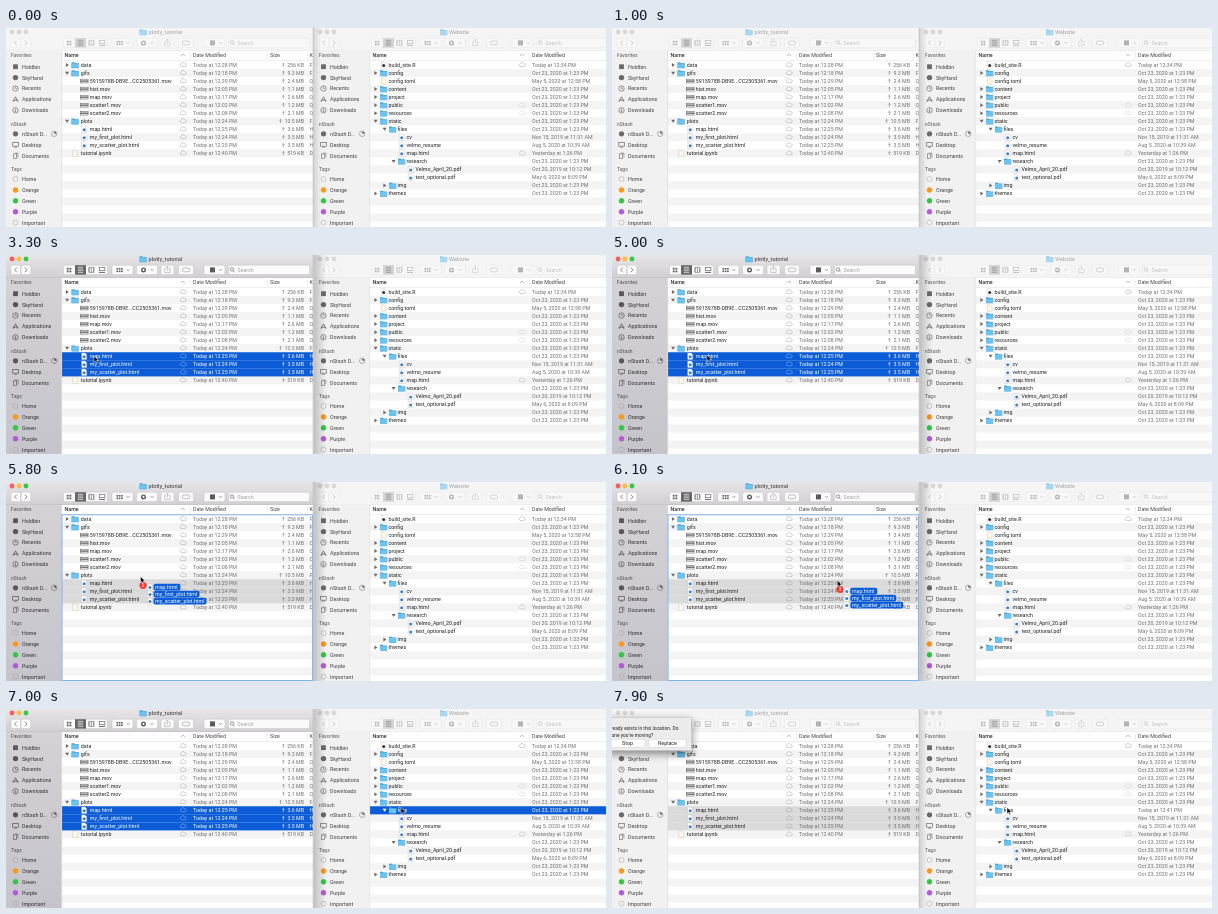
These frames come from a looping animation (600x199 px, 8000 ms). An HTML page:

```html
<!DOCTYPE html>
<html lang="en">
<head>
<meta charset="utf-8">
<title>Moving files</title>
<style>
html, body { margin: 0; width: 100%; height: 100%; overflow: hidden; background: #fff; }
svg { display: block; width: 100vw; height: 100vh; }
text { font-family: Roboto, Inter, sans-serif; font-size: 5.3px; white-space: pre; }
</style>
</head>
<body>
<svg id="stage" viewBox="0 0 600 199">
  <defs>
    <linearGradient id="bar" x1="0" y1="0" x2="0" y2="1">
      <stop offset="0" stop-color="#e7e5e7"/><stop offset="1" stop-color="#d1cfd1"/>
    </linearGradient>
    <linearGradient id="side" x1="0" y1="0" x2="0" y2="1">
      <stop offset="0" stop-color="#d4d2d5"/><stop offset="1" stop-color="#c5c4cb"/>
    </linearGradient>
    <linearGradient id="shade">
      <stop offset="0" stop-color="#000" stop-opacity=".2"/><stop offset="1" stop-color="#000" stop-opacity="0"/>
    </linearGradient>
    <clipPath id="clipL"><rect width="307" height="199"/></clipPath>
    <filter id="soft" x="-30%" y="-60%" width="160%" height="260%"><feGaussianBlur stdDeviation="4"/></filter>
  </defs>
  <g id="scene"></g>
  <g id="drag"></g>
  <path id="cursor" d="M0 0V6.3L1.5 4.9 2.6 7.2 3.7 6.7 2.6 4.5H4.6Z" fill="#000" stroke="#fff" stroke-width=".5"/>
</svg>
<script>
const $ = id => document.getElementById(id);
const LOOP = 8000, PITCH = 8.03, BLUE = '#0b5cd6', SPLIT = 307.5;

const rect = (x, y, w, h, fill, more = '') => `<rect x="${x}" y="${y}" width="${w}" height="${h}" fill="${fill}" ${more}/>`;
const disc = (x, y, r, fill, more = '') => `<circle cx="${x}" cy="${y}" r="${r}" fill="${fill}" ${more}/>`;
const line = (d, color, w = .6) => `<path d="${d}" fill="none" stroke="${color}" stroke-width="${w}"/>`;
const text = (x, y, s, fill = '#2b2b2b', more = '') => `<text x="${x}" y="${y + 1.9}" fill="${fill}" ${more}>${s}</text>`;

// Rows: level, kind, name, date, cloud tone, size, first letter of file type
const leftRows = [
  [0, 'closed', 'data', 'Today at 12:28 PM', 1, '256 KB', 'F'],
  [0, 'open', 'gifs', 'Today at 12:18 PM', 1, '9.3 MB', 'F'],
  [1, 'movie', '5915978B-DB9E...CC2505361.mov', 'Today at 12:29 PM', 1, '2.4 MB', 'Q'],
  [1, 'movie', 'hist.mov', 'Today at 12:05 PM', 1, '1.1 MB', 'Q'],
  [1, 'movie', 'map.mov', 'Today at 12:17 PM', 1, '2.6 MB', 'Q'],
  [1, 'movie', 'scatter1.mov', 'Today at 12:02 PM', 1, '1.2 MB', 'Q'],
  [1, 'movie', 'scatter2.mov', 'Today at 12:08 PM', 1, '2.1 MB', 'Q'],
  [0, 'open', 'plots', 'Today at 12:24 PM', 1, '10.5 MB', 'F'],
  [1, 'html', 'map.html', 'Today at 12:25 PM', 1, '3.6 MB', 'H'],
  [1, 'html', 'my_first_plot.html', 'Today at 12:24 PM', 1, '3.5 MB', 'H'],
  [1, 'html', 'my_scatter_plot.html', 'Today at 12:25 PM', 1, '3.5 MB', 'H'],
  [0, 'page', 'tutorial.ipynb', 'Today at 12:40 PM', 1, '519 KB', 'D']
];
const built = 'Oct 23, 2020 at 1:23 PM';
const rightRows = [
  [0, 'code', 'build_site.R', 'Today at 12:34 PM', 1],
  [0, 'closed', 'config', built, 0],
  [0, 'page', 'config.toml', 'May 5, 2020 at 12:58 PM', 0],
  [0, 'closed', 'content', built, 0],
  [0, 'closed', 'project', built, 0],
  [0, 'closed', 'public', built, .5],
  [0, 'closed', 'resources', built, .5],
  [0, 'open', 'static', built, 0],
  [1, 'open', 'files', built, 0],
  [2, 'html', 'cv', 'Nov 15, 2019 at 11:31 AM', 0],
  [2, 'html', 'velmo_resume', 'Aug 5, 2020 at 10:39 AM', 0],
  [2, 'html', 'map.html', 'Yesterday at 1:26 PM', .8],
  [2, 'open', 'research', built, 0],
  [3, 'html', 'Velmo_April_20.pdf', 'Oct 20, 2019 at 10:12 PM', 0],
  [3, 'html', 'test_optional.pdf', 'May 6, 2020 at 8:09 PM', 0],
  [1, 'closed', 'img', built, 0],
  [0, 'closed', 'themes', built, 0]
];

function folder(x, y) {
  return `<path d="M${x} ${y - 2.8}h2.8l.8 .8h3.6v5.2h-7.2z" fill="#46a8dd"/>` + rect(x, y - 1.4, 7.2, 4.2, '#6cc3f0', 'rx=".4"');
}
function page(x, y, dot) {
  return `<path d="M${x} ${y - 3.2}h3.4l1.6 1.6v4.8h-5z" fill="#fff" stroke="#bdbdbd" stroke-width=".4"/>` +
    (dot ? disc(x + 2.5, y + .5, 1.5, dot) : '');
}
function icon(kind, x, y) {
  if (kind === 'open' || kind === 'closed') return folder(x, y);
  if (kind === 'movie') return rect(x, y - 1.9, 7.6, 3.8, '#f2f2f2', 'stroke="#555" stroke-width=".5"') + line(`M${x} ${y}h7.6`, '#4a4a4a', 1.1);
  if (kind === 'page') return page(x + 1.2, y, '').replace('#fff', '#fdf8e4');
  return page(x + 1.2, y, kind === 'code' ? '#333' : '#3f7fc4');
}
function twist(kind, x, y, color) {
  if (kind === 'open') return `<path d="M${x - 2} ${y - 1.4}h4l-2 3z" fill="${color}"/>`;
  if (kind === 'closed') return `<path d="M${x - 1.2} ${y - 2}v4l3-2z" fill="${color}"/>`;
  return '';
}
function cloud(x, y, tone, color) {
  return `<path d="M${x - 2} ${y + 1.5}a1.3 1.3 0 0 1 0-2.4a2 2 0 0 1 3.8-.4a1.4 1.4 0 0 1 .2 2.8z" fill="none" stroke="${color}" stroke-width=".45" opacity="${tone}"/>`;
}

function sideIcon(i, x, y, c) {
  const shapes = [
    () => rect(x - 2.4, y - 2.4, 4.8, 4.8, c),
    () => disc(x, y, 2.7, c),
    () => disc(x, y, 2.7, 'none', `stroke="${c}" stroke-width=".7"`) + line(`M${x} ${y - 1.8}V${y}h1.5`, c),
    () => line(`M${x - 2.5} ${y + 2.5}L${x} ${y - 2.6}L${x + 2.5} ${y + 2.5}M${x - 2.8} ${y + .8}h5.6`, c, .8),
    () => disc(x, y, 2.7, 'none', `stroke="${c}" stroke-width=".7"`) + line(`M${x} ${y - 1.7}v3M${x - 1.2} ${y + .3}l1.2 1.2 1.2-1.2`, c),
    () => disc(x, y, 2.6, c),
    () => rect(x - 2.8, y - 2.4, 5.6, 3.8, 'none', `stroke="${c}" stroke-width=".7"`) + line(`M${x - 1.5} ${y + 2.5}h3`, c),
    () => rect(x - 2.2, y - 1.9, 3.4, 4.6, 'none', `stroke="${c}" stroke-width=".6"`) + line(`M${x - .8} ${y - 2.7}h3.2v4.4`, c)
  ];
  return shapes[i]();
}

function sidebar(x, active, hot) {
  const head = active ? '#69676c' : '#747275', ink = active ? '#2f2e30' : '#3f3d40', tone = active ? '#58565a' : '#6b696c';
  let s = rect(x, 23, 55.6, 176, active ? 'url(#side)' : '#f2f1f2');
  [['Favorites', 27], ['nStash', 96], ['Tags', 141.5]].forEach(([n, y]) => s += text(x + 5, y, n, head, 'font-weight="500" style="font-size:5px"'));
  const items = ['Holdbin', 'SkyHand', 'Recents', 'Applications', 'Downloads', 'nStash D...', 'Desktop', 'Documents'];
  items.forEach((n, i) => {
    const y = i < 5 ? 38.7 + i * 10.9 : 105.8 + (i - 5) * 11, lit = hot && i === 5;
    if (lit) s += rect(x, y - 5.5, 55.6, 11, '#5f97e3');
    s += sideIcon(i, x + 9.5, y, lit ? '#fff' : tone) + text(x + 16, y, n, lit ? '#fff' : ink);
    if (i === 5) s += disc(x + 48.2, y, 2.7, 'none', `stroke="${tone}" stroke-width=".5"`) +
      `<path d="M${x + 48.2} ${y}v-2.2a2.2 2.2 0 0 1 2.2 2.2z" fill="${tone}"/>`;
  });
  const tags = [['Home', ''], ['Orange', '#f8981d'], ['Green', '#35c445'], ['Purple', '#b15bd3'], ['Important', '']];
  tags.forEach(([n, c], i) => {
    const y = 151 + i * 10.9;
    s += disc(x + 9.5, y, 2.5, c || 'none', `stroke="${c || '#a09ea1'}" stroke-width=".5"`) + text(x + 16, y, n, ink);
  });
  return s;
}

function toolbar(x, width, title, titleX, active) {
  const ink = active ? '#5b5b5b' : '#b4b3b4', faint = active ? '#a5a5a5' : '#c4c3c4';
  const face = active ? '#fbfbfb' : '#f8f8f8', edge = active ? '#bab8ba' : '#e3e3e3';
  const box = (a, w) => rect(x + a, 10.2, w, 9.4, face, `rx="1.6" stroke="${edge}" stroke-width=".4"`);
  let s = rect(x, 0, width, 23, active ? 'url(#bar)' : '#f6f5f6');
  ['#fc5b57', '#fdbc40', '#34c84a'].forEach((c, i) => s += disc(x + 6 + i * 7, 4, 2.4, active ? c : '#d9d8d9'));
  s += `<g opacity="${active ? 1 : .55}">${folder(titleX - 9, 4)}</g>` + text(titleX, 4, title, active ? '#333' : '#a3a2a3', 'style="font-size:5.6px"');
  [[5, 9.6], [15.2, 9.6], [57.5, 44], [106, 21], [130.5, 21], [155, 13], [172.5, 15], [198, 21], [222.5, 81]].forEach(b => s += box(...b));
  s += line(`M${x + 10.8} 12.6l-2.2 2.3 2.2 2.3M${x + 18.8} 12.6l2.2 2.3-2.2 2.3`, ink, .7);
  s += rect(x + 69, 10.2, 11, 9.4, active ? '#666' : '#d4d3d4');
  for (let i = 0; i < 4; i++) {
    s += rect(x + 60.8 + (i % 2) * 2.7, 12.8 + (i >> 1) * 2.7, 1.8, 1.8, ink);
    s += line(`M${x + 71.8} ${12.3 + i * 1.7}h5.4`, active ? '#fff' : '#8c8c8c', .65);
    if (i < 3) s += line(`M${x + 83 + i * 2.4} 12.4v5`, ink);
  }
  s += line(`M${x + 83} 12.4h4.8v5h-4.8z`, ink, .5) + rect(x + 93.3, 12.4, 5.6, 3.3, 'none', `stroke="${ink}" stroke-width=".6"`) + line(`M${x + 93} 17.4h6.2`, ink, .9);
  for (let i = 0; i < 6; i++) s += rect(x + 110.5 + (i % 3) * 2.3, 13 + (i / 3 | 0) * 2.5, 1.6, 1.6, ink);
  s += disc(x + 137.5, 14.9, 1.8, 'none', `stroke="${ink}" stroke-width="1.4"`);
  [122, 146, 214.5].forEach(a => s += line(`M${x + a - 1.4} 14.2l1.4 1.4 1.4-1.4`, ink));
  s += line(`M${x + 160} 13.6h-1.3v4h5.4v-4h-1.3M${x + 161.4} 15.8v-4.6l-1.3 1.3m1.3-1.3l1.3 1.3`, faint, .6);
  s += rect(x + 176.3, 13, 7.4, 3.8, 'none', `rx="1.8" stroke="${faint}" stroke-width=".7"`);
  s += rect(x + 204, 12.4, 5, 5, ink);
  s += disc(x + 226, 14.4, 1.7, 'none', `stroke="${ink}" stroke-width=".6"`) + line(`M${x + 227.2} 15.6l1.6 1.6`, ink);
  s += text(x + 231.5, 15, 'Search', faint);
  return s + rect(x, 22.7, width, .4, active ? '#b4b2b4' : '#dcdcdc');
}

function list(x, width, rows, cols, marks) {
  let s = rect(x, 23, width, 176, '#fff');
  for (let i = 1; i < 21; i += 2) s += rect(x, 33 + i * PITCH, width, PITCH, '#f4f4f5');
  s += rect(x, 32.4, width, .4, '#d8d8d8');
  s += text(x + 2.5, 27, 'Name', '#333', 'font-weight="500"') + text(cols.date, 27, 'Date Modified', '#444');
  s += line(`M${cols.cloud - 2} 27.9l2-1.8 2 1.8`, '#8a8a8a', .55) + rect(cols.date - 3, 24.5, .4, 6.5, '#d5d5d5');
  if (cols.size) {
    s += text(cols.size, 27, 'Size', '#444') + text(cols.type, 27, 'Kind', '#444');
    [cols.size, cols.type].forEach(c => s += rect(c - 2.5, 24.5, .4, 6.5, '#d5d5d5'));
  }
  rows.forEach(([level, kind, name, date, tone, size, type], i) => {
    const y = 37 + i * PITCH, mark = marks[i], on = mark === BLUE;
    const ink = on ? '#fff' : '#222', soft = on ? '#fff' : '#707070', ix = cols.icon + level * 9;
    if (mark) s += rect(x, y - 4, width, PITCH + .1, mark);
    s += twist(kind, ix - 4.4, y, on ? '#fff' : '#6a6a6a') + icon(kind, ix, y) + text(ix + cols.gap, y, name, ink) + text(cols.date, y, date, soft);
    if (tone) s += cloud(cols.cloud, y, tone, on ? '#a9c6f2' : '#9c9c9c');
    if (size) {
      const ax = 294.5 - size.length * 2.85;
      s += line(`M${ax} ${y + 1.8}v-3.6m-1.2 1.2l1.2-1.2 1.2 1.2`, soft, .55) +
        text(298, y, size, soft, 'text-anchor="end"') + text(cols.type, y, type, soft);
    }
  });
  return s;
}

function dialog() {
  let s = rect(-20, 11, 100, 34, '#000', 'opacity=".45" filter="url(#soft)"');
  s += rect(-10, 8.5, 89.5, 33, '#ececec', 'stroke="#bcbcbc" stroke-width=".4"');
  s += text(-1, 19, 'ready exists in this location. Do', '#222', 'style="font-size:4.9px"') + text(-.5, 26.2, "one you're moving?", '#222', 'style="font-size:4.9px"');
  [[-4, 37, 'Stop', 15.5], [37, 37, 'Replace', 55.5]].forEach(([x, w, n, c]) =>
    s += rect(x, 30.3, w, 8, '#fff', 'rx="1.4" stroke="#c2c2c2" stroke-width=".4"') + text(c, 34.3, n, '#222', 'text-anchor="middle"'));
  return s;
}

function scene({ active, picked, inside, hot, target, asked }) {
  const lm = {}, rm = {};
  for (let i = 0; i < picked; i++) lm[8 + i] = inside || asked ? '#dadada' : BLUE;
  if (target) rm[8] = BLUE;
  const rows = rightRows.map((r, i) => asked && i === 8 ? [...r.slice(0, 3), 'Today at 12:41 PM', 0] : r);
  let s = toolbar(308, 292, 'Website', 443, false) + sidebar(308, false, hot) +
    list(364, 236, rows, { icon: 374, gap: 8.5, date: 526, cloud: 516 }, rm) + rect(363.6, 23, .5, 176, '#d6d5d6');
  s += rect(308, 0, active ? 12 : 7, 199, 'url(#shade)', `opacity="${active ? 1 : .6}"`);
  s += `<g clip-path="url(#clipL)">` + toolbar(0, 307, 'plotly_tutorial', 142.5, active) + sidebar(0, active, false) +
    list(56, 251, leftRows, { icon: 65.5, gap: 9.3, date: 187, cloud: 177, size: 264, type: 303.5 }, lm) + rect(55.6, 23, .5, 176, '#cfcdcf') + '</g>';
  s += rect(SPLIT - .7, 0, .8, 199, '#a9a8a9');
  if (inside) s += rect(56, 32.8, 250.6, 165.7, 'none', 'stroke="#7fb2ee" stroke-width="1"');
  return asked ? s + dialog() : s;
}

function dragImage() {
  let s = '';
  [['map.html', 27], ['my_first_plot.html', 46], ['my_scatter_plot.html', 53]].forEach(([n, w], i) => {
    const y = 10.6 + i * 7;
    s += page(7, y, '#3f7fc4') + rect(13, y - 3.4, w, 6.8, BLUE, 'rx="2"') + text(14.6, y, n, '#fff');
  });
  return s + disc(2.6, 8.8, 3.6, '#f03c32') + text(2.6, 8.8, '3', '#fff', 'text-anchor="middle"');
}

// Pointer stops: time, x, y
const path = [
  [1200, 140, 203], [1650, 96, 99.5], [2100, 96, 99.5], [2400, 92, 114], [2700, 92, 114], [3200, 88, 101],
  [3900, 88, 101], [4400, 95, 100], [5250, 95, 100], [5800, 134.5, 94.5], [6500, 364, 104.5], [6850, 395, 98.5], [LOOP, 395, 98.5]
];
function pointer(t) {
  const i = path.findIndex(p => p[0] > t);
  if (i < 1) return null;
  const [t0, x0, y0] = path[i - 1], [t1, x1, y1] = path[i];
  const k = (t - t0) / (t1 - t0), e = k * k * (3 - 2 * k);
  return [x0 + (x1 - x0) * e, y0 + (y1 - y0) * e];
}

let last = '';
function draw(t) {
  const at = pointer(t), held = t >= 5300 && t < 7000, x = at ? at[0] : 0;
  const asked = t >= 7100;
  const state = {
    active: t >= 1500 && !asked,
    picked: t < 1650 ? 0 : t < 2400 ? 1 : 3,
    inside: held && x < SPLIT,
    hot: held && x > 312 && x < 366,
    target: t >= 6700 && t < 7100,
    asked
  };
  const key = JSON.stringify(state);
  if (key !== last) $('scene').innerHTML = scene(state);
  last = key;
  $('cursor').style.display = at ? '' : 'none';
  $('drag').style.display = held ? '' : 'none';
  if (!at) return;
  const move = `translate(${at[0].toFixed(2)} ${at[1].toFixed(2)})`;
  $('cursor').setAttribute('transform', move);
  $('drag').setAttribute('transform', move);
}

$('drag').innerHTML = dragImage();
const start = performance.now();
function tick() {
  draw((performance.now() - start) % LOOP);
  requestAnimationFrame(tick);
}
tick();
</script>
</body>
</html>
```
